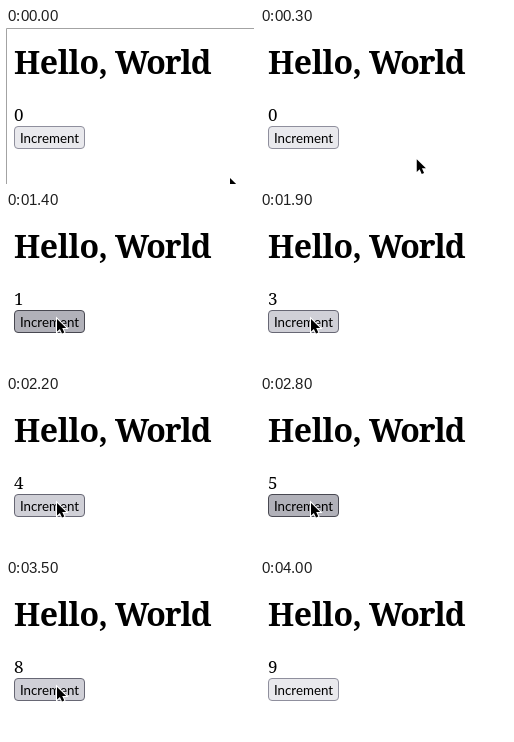
Animation of 248x156 px, one loop 4.7 s. Source, as an HTML page:

```html
<!DOCTYPE html>
<html lang="en">
<head>
<meta charset="utf-8">
<title>Counter</title>
<style>
  html, body { margin: 0; width: 100%; height: 100%; overflow: hidden; background: #fff; }
  svg { display: block; width: 248px; height: 156px; }
  .title { font: bold 32px "Noto Serif", serif; }
  .hello { letter-spacing: -.4px; }
  .world { letter-spacing: -1px; }
  #count { font: 17px "Noto Serif", serif; }
  .label { font: 13.333px Lato, sans-serif; text-anchor: middle; }
  #button { fill: #e9e9ed; stroke: #8f8f9d; }
  #button.hover { fill: #d0d0d7; stroke: #676774; }
  #button.active { fill: #b1b1b9; stroke: #484851; }
  #pointer { stroke: #fff; stroke-width: 2px; paint-order: stroke; }
  #edge { fill: none; stroke: #a3a3a3; animation: edge 4.7s step-end infinite; }
  @keyframes edge { 0% { opacity: 1; } 2.1277% { opacity: 0; } }
</style>
</head>
<body>
<svg viewBox="0 0 248 156">
  <path id="edge" d="M.5 156V.5H248"/>
  <g class="title">
    <text class="hello" x="8" y="46">Hello,</text>
    <text class="world" x="109" y="46">World</text>
  </g>
  <text id="count" x="8" y="93">0</text>
  <rect id="button" x="8.5" y="98.5" width="70" height="22" rx="3.5"/>
  <text class="label" x="43.5" y="115">Increment</text>
  <path id="pointer" d="M0 0V12.6L2.9 9.9L5 14.6L7.3 13.6L5.2 9H9.2Z"/>
</svg>
<script>
  // all times are counted in steps of 100 ms
  const STEP = 100, LOOP = 47, CLICKS = 9, HOLD = 1.427;
  const ARRIVE = 7, LEAVE = 40;

  const [count, button, pointer] =
    ["count", "button", "pointer"].map(id => document.getElementById(id));

  // the clicking slowly gets quicker
  const press = i => 9.49 + 4.12 * i - 0.087 * i * i;
  const clicks = Array.from({ length: CLICKS }, (_, i) => press(i));
  const passed = (step, delay) => clicks.filter(c => Math.round(c + delay) <= step).length;
  const clamp = v => Math.min(1, Math.max(0, v));

  function draw(step) {
    // glide to the button, then settle a little lower
    const far = (1 + Math.cos(Math.PI * clamp(step / ARRIVE))) / 2;
    const settle = clamp((step - ARRIVE) / 2);
    const x = 51 + 173 * far;
    const y = 102 + 48 * far + 5 * settle;

    const shown = step < LEAVE;
    const over = shown && x < 79 && y < 121;
    const n = passed(step, HOLD);
    const down = passed(step, 0) > n;

    count.textContent = n;
    button.setAttribute("class", down ? "active" : over ? "hover" : "");
    pointer.setAttribute("transform", `translate(${x} ${y})`);
    pointer.setAttribute("visibility", shown ? "visible" : "hidden");
  }

  const start = performance.now();
  function tick() {
    draw(Math.floor((performance.now() - start) / STEP) % LOOP);
    requestAnimationFrame(tick);
  }
  tick();
</script>
</body>
</html>
```
